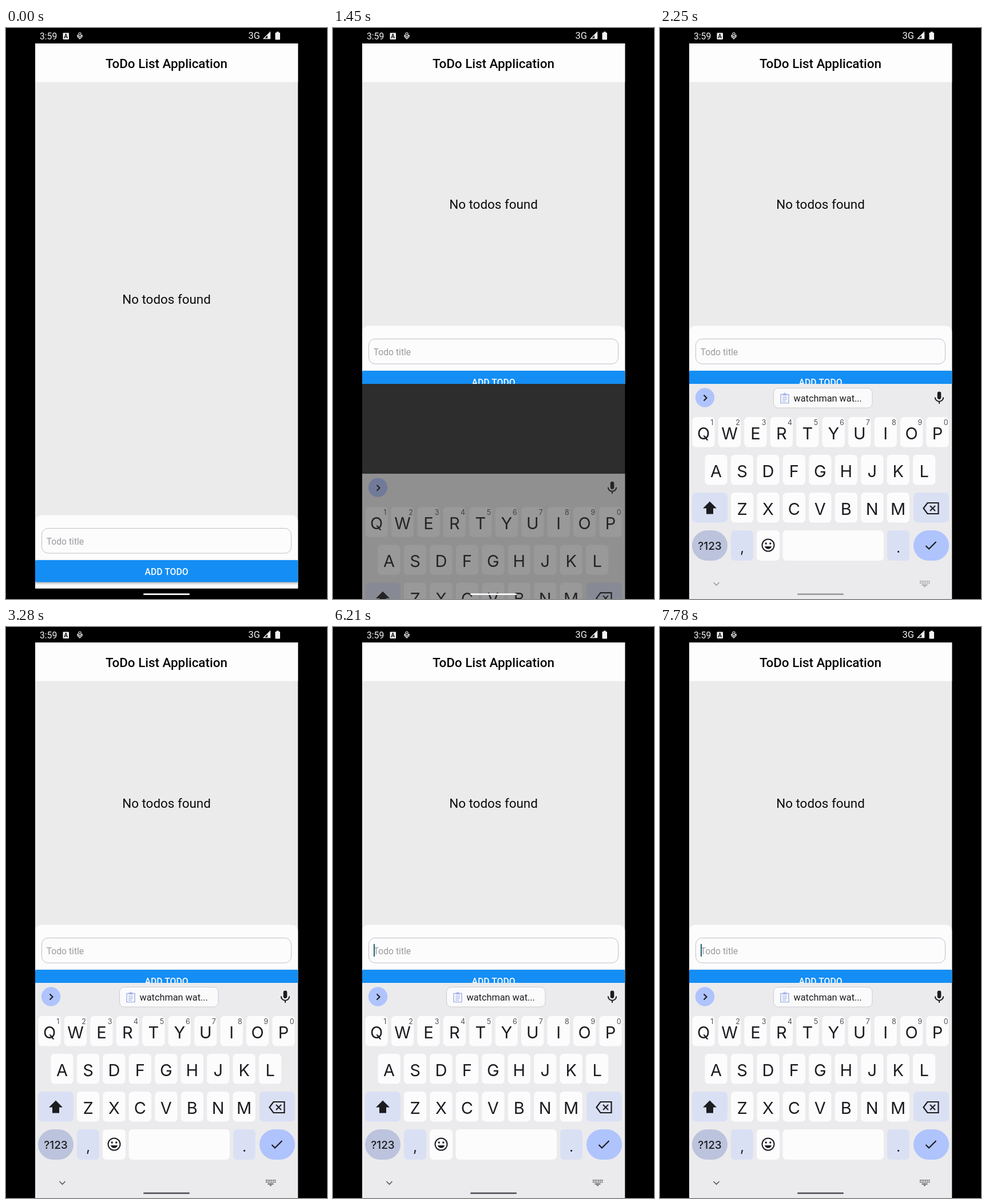
Write an HTML page with a canvas that moves like this. It is 561x998 px and loops after 8 s.

```html
<!DOCTYPE html>
<html lang="en">
<head>
<meta charset="utf-8">
<title>ToDo List Application</title>
<style>
  html, body { margin: 0; width: 100%; height: 100%; overflow: hidden; background: #000; }
  canvas { display: block; width: 561px; height: 998px; }
</style>
</head>
<body>
<canvas id="stage"></canvas>
<script>
const W = 561, H = 998, LOOP = 8000;
const LEFT = 51, WIDTH = 459.5;
const KEYS_TOP = 622, KEYS_HEIGHT = H - KEYS_TOP;
const SLIDE_START = 1370, SLIDE_TIME = 320, LIFT = 331;
const INK = '#1c1c20', KEY = '#fcfcfd', SIDE_KEY = '#dae0f4', ACCENT = '#afc3fd';
const ROBOTO = 'Roboto, sans-serif', INTER = 'Inter, sans-serif';

const canvas = document.getElementById('stage');
const ctx = canvas.getContext('2d');
const dpr = window.devicePixelRatio || 1;
canvas.width = W * dpr;
canvas.height = H * dpr;

const clamp = v => Math.min(1, Math.max(0, v));
const ramp = (t, from, to) => clamp((t - from) / (to - from));
const mix = (a, b, p) => a + (b - a) * p;

// Decelerating curve: cubic-bezier(0, 0, 0.2, 1)
function decelerate(x) {
  let lo = 0, hi = 1;
  for (let i = 0; i < 24; i++) {
    const s = (lo + hi) / 2;
    if (0.6 * (1 - s) * s * s + s * s * s < x) lo = s; else hi = s;
  }
  return 3 * (1 - lo) * lo * lo + lo * lo * lo;
}

function rect(x, y, w, h, color) {
  ctx.fillStyle = color;
  ctx.fillRect(x, y, w, h);
}

function box(x, y, w, h, r, fill, stroke) {
  ctx.beginPath();
  ctx.roundRect(x, y, w, h, r);
  if (fill) { ctx.fillStyle = fill; ctx.fill(); }
  if (stroke) { ctx.strokeStyle = stroke; ctx.lineWidth = 1; ctx.stroke(); }
}

function disc(x, y, r, fill) {
  ctx.beginPath();
  ctx.arc(x, y, r, 0, 7);
  ctx.fillStyle = fill;
  ctx.fill();
}

function path(d, { fill, stroke, width = 2 }, x = 0, y = 0) {
  ctx.save();
  ctx.translate(x, y);
  const p = new Path2D(d);
  if (fill) { ctx.fillStyle = fill; ctx.fill(p); }
  if (stroke) { ctx.strokeStyle = stroke; ctx.lineWidth = width; ctx.stroke(p); }
  ctx.restore();
}

function text(str, x, y, font, color, align = 'center') {
  ctx.font = font;
  ctx.fillStyle = color;
  ctx.textAlign = align;
  ctx.fillText(str, x, y);
}

function drawStatusBar() {
  text('3:59', 59, 19.5, `15.7px ${ROBOTO}`, '#f2f2f2', 'left');
  box(99.5, 8.5, 10.5, 11.5, 1, '#f4f4f4');
  text('A', 104.7, 18, `bold 10px ${ROBOTO}`, '#111');
  path('M-4 -2 L0 2 L4 -2 M-4 -2 V1 L0 5 L4 1 V-2', { stroke: '#eee', width: 1.3 }, 129, 14);
  ctx.beginPath();
  ctx.arc(129, 10, 2, 0, 7);
  ctx.strokeStyle = '#eee';
  ctx.lineWidth = 1.2;
  ctx.stroke();
  text('3G', 423.5, 19.3, `16.5px ${ROBOTO}`, '#f2f2f2', 'left');
  path('M450.5 18.5 L461.5 7.5 V18.5 Z', { stroke: '#eee', width: 1.5 });
  path('M457 12 L462 7 V19 H457 Z', { fill: '#eee' });
  box(470.5, 8, 8.5, 12.5, 1.3, '#f4f4f4');
  rect(473, 6.5, 3.6, 2, '#f4f4f4');
}

function drawApp(t, open) {
  const lift = open ? LIFT : 0;
  ctx.save();
  ctx.beginPath();
  ctx.rect(LEFT, 27, WIDTH, (open ? KEYS_TOP : 979.5) - 27);
  ctx.clip();
  rect(LEFT, 27, WIDTH, H, '#ebebeb');
  rect(LEFT, 27, WIDTH, 67.5, '#fdfdfd');
  text('ToDo List Application', 280.5, 69.5, `500 22.4px ${ROBOTO}`, '#050505');
  text('No todos found', 280.5, open ? 316 : 482, `22.4px ${ROBOTO}`, '#0a0a0a');

  ctx.translate(0, -lift);
  box(LEFT, 851.5, WIDTH, 140, [11, 11, 0, 0], '#fcfcfd');
  box(62.5, 874.5, 436, 43.5, 11, null, '#bfbfc8');
  text('Todo title', 70.7, 902.5, `15.7px ${ROBOTO}`, '#9c9ca0', 'left');
  if (caretOn(t)) rect(71, 886 - (open ? 1 : 0), 2, 22, '#1d6672');

  ctx.shadowColor = 'rgba(0,0,0,0.32)';
  ctx.shadowBlur = 4 * dpr;
  ctx.shadowOffsetY = 2 * dpr;
  box(LEFT, 930, WIDTH, 38.5, 2, '#148ef4');
  ctx.shadowColor = 'transparent';
  text('ADD TODO', 280.5, 955.8, `500 15.7px ${ROBOTO}`, '#f8fbff');
  ctx.restore();
}

// The caret lights up on focus and then toggles about twice a second.
function caretOn(t) {
  if (t < 680) return false;
  return Math.floor((t - 1180 + 503) / 503.5) % 2 === 0;
}

function drawKeyRow(letters, firstX, y, hints) {
  [...letters].forEach((letter, i) => {
    const x = firstX + i * 45.45;
    box(x - 19.6, y, 39.2, 52.5, 6.5, KEY);
    text(letter, x, y + 39, `29px ${INTER}`, INK);
    if (hints) text(hints[i], x + 14.7, y + 14, `12.5px ${INTER}`, '#505056');
  });
}

function drawStrip(t) {
  disc(78.5, 646, 16.7, ACCENT);
  path('M-2.5 -5 L2.5 0 L-2.5 5', { stroke: INK, width: 2.1 }, 79, 646.5);

  ctx.globalAlpha = ramp(t, 1750, 2000);
  box(198.5, 629.5, 172.5, 34.5, 8, '#fafafb', '#cccdd2');
  path('M211 640.5 H225 V655.5 H211 Z', { stroke: '#a9b8ea', width: 1.6 });
  path('M214.5 639 H221.5 V642.5 H214.5 Z M218 637 l2.5 3 h-5 Z', { fill: '#a9b8ea' });
  path('M214 645.5 H222 M214 648.7 H222 M214 652 H220', { stroke: '#a9b8ea', width: 1.4 });
  text('watchman wat...', 233.5, 653, `16.3px ${ROBOTO}`, INK, 'left');
  ctx.globalAlpha = 1;

  box(484.7, 635.5, 6.6, 13.5, 3.3, INK);
  path('M480.8 645.5 a7.2 7.2 0 0 0 14.4 0 M488 652.5 V656.8', { stroke: INK, width: 2 });
}

function drawKeyboard(t, tint) {
  rect(LEFT, KEYS_TOP, WIDTH, KEYS_HEIGHT, '#ebebed');
  drawStrip(t);
  drawKeyRow('QWERTYUIOP', 76, 680, '1234567890');
  drawKeyRow('ASDFGHJKL', 98, 746);
  drawKeyRow('ZXCVBNM', 143.5, 812);

  box(56, 812, 62, 52.5, 7, SIDE_KEY);
  path('M0 -11.5 L12 0.5 H6 V10.5 H-6 V0.5 H-12 Z', { fill: INK }, 87, 839);
  box(443, 812, 62, 52.5, 7, SIDE_KEY);
  path('M-13 0 L-6 -9.5 H13 V9.5 H-6 Z', { stroke: INK, width: 2.2 }, 473.5, 839.5);
  path('M-1.5 -4.5 L7.5 4.5 M7.5 -4.5 L-1.5 4.5', { stroke: INK }, 473.5, 839.5);

  box(56, 878, 62, 53, 26.5, '#bcc3dc');
  text('?123', 87, 912, `500 19px ${INTER}`, INK);
  box(124, 878, 39, 53, 6.5, SIDE_KEY);
  text(',', 143.5, 917, `25px ${INTER}`, INK);
  box(169, 878, 40, 53, 6.5, KEY);
  drawSmiley(189, 904);
  box(214.5, 878, 176.5, 53, 6.5, KEY);
  box(397, 878, 39, 53, 6.5, SIDE_KEY);
  text('.', 416.5, 917, `25px ${INTER}`, INK);
  box(443, 878, 62, 53, 26.5, ACCENT);
  path('M-9 0.5 L-3.5 6 L9 -6.5', { stroke: INK, width: 2.2 }, 473.5, 904.5);

  path('M-5 -2.5 L0 2.5 L5 -2.5', { stroke: tint, width: 1.7 }, 98.5, 971.5);
  for (let row = 0; row < 2; row++)
    for (let i = 0; i < 6; i++) rect(454 + i * 3.1, 966 + row * 3.2, 1.9, 2, tint);
  rect(457.5, 972.6, 10, 1.8, tint);
  path('M460 975.3 H465 L462.5 977.5 Z', { fill: tint });
}

function drawSmiley(x, y) {
  ctx.beginPath();
  ctx.arc(x, y, 10.5, 0, 7);
  ctx.strokeStyle = INK;
  ctx.lineWidth = 2;
  ctx.stroke();
  disc(x - 3.8, y - 3, 1.7, INK);
  disc(x + 3.8, y - 3, 1.7, INK);
  path('M-6 2 H6 A6.2 6.2 0 0 1 -6 2 Z', { fill: INK }, x, y);
}

function drawTouch(x, y, alpha) {
  ctx.globalAlpha = alpha;
  disc(x, y, 12.7, 'rgba(250,250,251,0.8)');
  ctx.strokeStyle = '#bfc8da';
  ctx.lineWidth = 1.8;
  ctx.stroke();
  ctx.globalAlpha = 1;
}

const touches = [
  { from: 500, to: 860, a: [340, 897], b: [340, 897] },
  { from: 4190, to: 4960, a: [411, 323], b: [400, 437] },
  { from: 6480, to: 6850, a: [417, 660], b: [417, 660] },
  { from: 7360, to: 7730, a: [417, 660], b: [417, 660] }
];

function drawTouches(t) {
  for (const { from, to, a, b } of touches) {
    if (t < from || t >= to) continue;
    const p = ramp(t, from, to);
    drawTouch(mix(a[0], b[0], p), mix(a[1], b[1], p), ramp(t, to, to - 90));
  }
}

function draw(t) {
  ctx.setTransform(dpr, 0, 0, dpr, 0, 0);
  rect(0, 0, W, H, '#000');
  drawStatusBar();
  const open = t >= SLIDE_START;
  drawApp(t, open);

  const fade = 1 - Math.pow(1 - ramp(t, 1650, 3250), 1.8);
  const shade = Math.round(mix(250, 88, fade));
  const tint = `rgb(${shade},${shade},${shade + 5})`;

  if (open) {
    const p = decelerate(ramp(t, SLIDE_START, SLIDE_START + SLIDE_TIME));
    ctx.save();
    ctx.beginPath();
    ctx.rect(LEFT, KEYS_TOP, WIDTH, KEYS_HEIGHT);
    ctx.clip();
    rect(LEFT, KEYS_TOP, WIDTH, KEYS_HEIGHT, '#2d2d2d');
    ctx.translate(0, (1 - p) * KEYS_HEIGHT);
    drawKeyboard(t, tint);
    rect(LEFT, KEYS_TOP, WIDTH, KEYS_HEIGHT, `rgba(45,45,45,${1 - Math.pow(p, 1.2)})`);
    ctx.restore();
  }
  box(240, 988.3, 81, 2.7, 1.3, tint);
  drawTouches(t);
}

const start = performance.now();
function tick() {
  draw((performance.now() - start) % LOOP);
  requestAnimationFrame(tick);
}
tick();
</script>
</body>
</html>
```
